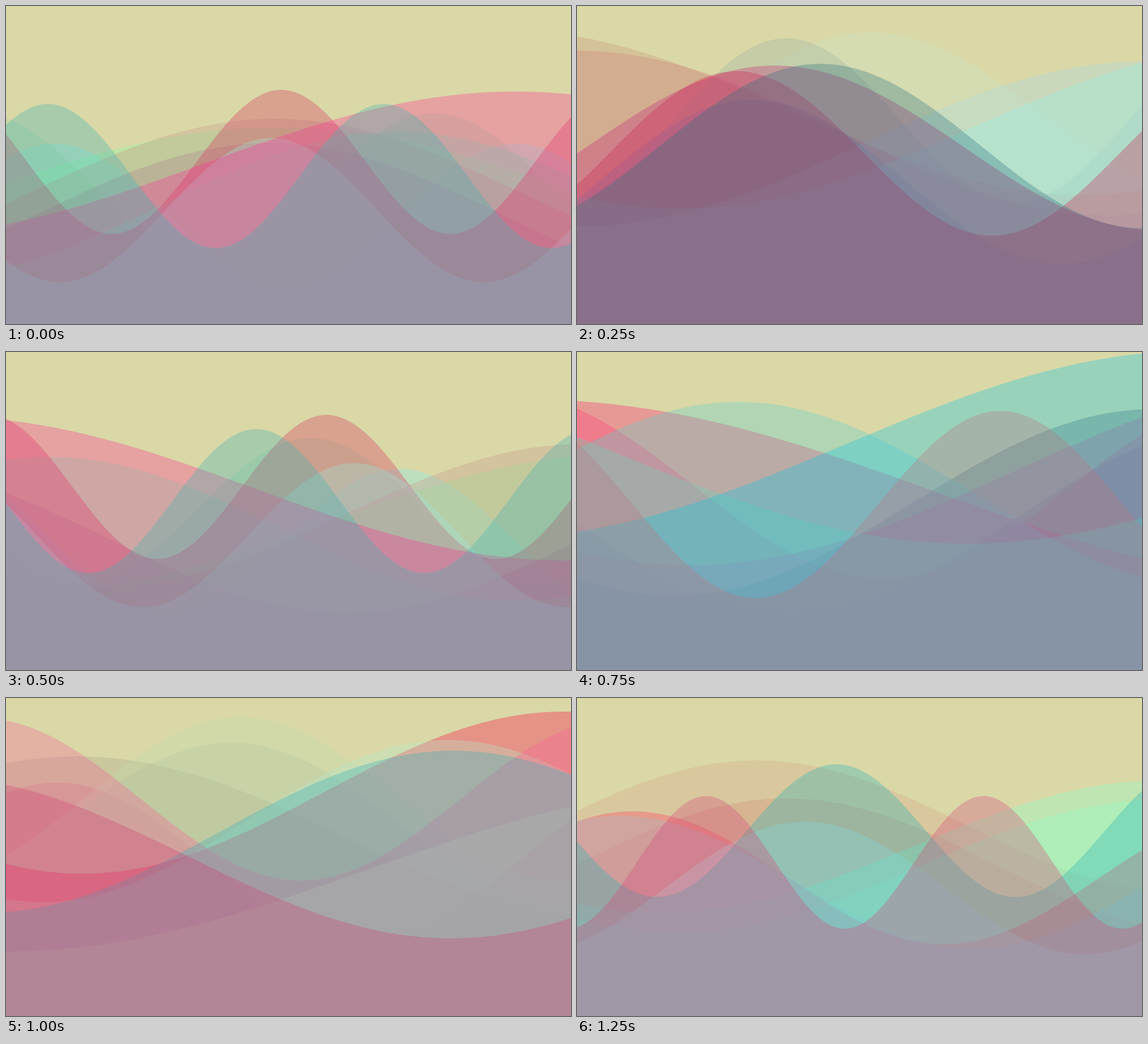
An HTML page with a canvas that plays this animation: 998 by 561 pixels, repeating every 1500 ms.

```html
<!DOCTYPE html>
<html lang="en">
<head>
<meta charset="utf-8">
<title>Layered waves</title>
<style>
  html, body { margin: 0; width: 100%; height: 100%; overflow: hidden; background: #dad8a7; }
  canvas { display: block; width: 100%; height: 100%; }
</style>
</head>
<body>
<canvas id="stage" width="998" height="561"></canvas>
<script>
const W = 998, H = 561, HOLD = 250, ALPHA = 0.32;
const ctx = document.getElementById('stage').getContext('2d');

// A wave is: crest x, crest y, wavelength, colour. Lists run back to front.
const scene = (amp, waves) => ({ amp, waves });

// One family of waves appears twice, slid sideways and lifted.
const family = (lift, crests) => scene(127, [
  [243, 815, '#82ebeb'],
  [189, 805, '#9acf9e'],
  [214, 2244, '#89f79b'],
  [199, 1710, '#c3968c'],
  [242, 1654, '#aa828c'],
  [222, 1645, '#70ebb4'],
  [148, 598, '#d4305a'],
  [233, 748, '#a0e4d8'],
  [151, 2200, '#fc2f92'],
  [173, 593, '#3eb2b0']
].map(([y, len, colour], i) => [crests[i], y - lift, len, colour]));

const purple = scene(145, [
  [520, 47, 1223, '#cde4c3'],
  [0, 79, 1886, '#d77882'],
  [-126, 43, 2033, '#c79378'],
  [370, 57, 806, '#9bb29e'],
  [1228, 67, 2096, '#8cfaeb'],
  [310, 165, 1090, '#6496be'],
  [1000, 98, 1980, '#a5d7e1'],
  [350, 105, 1340, '#c32378'],
  [282, 115, 902, '#cd2855'],
  [430, 102, 1135, '#2d7080']
]);

const slate = scene(165, [
  [-406, 130, 1572, '#967896'],
  [-130, 70, 1340, '#ff507d'],
  [1015, 101, 1690, '#465a64'],
  [-82, 84, 2890, '#ff166c'],
  [285, 88, 1693, '#5dccc9'],
  [-200, 46, 2287, '#c85596'],
  [-577, 8, 2535, '#69d2b9'],
  [1093, -2, 2475, '#12c5e2'],
  [748, 104, 866, '#bb7480']
]);
slate.waves[5][0] = 1343;

const rose = scene(143, [
  [90, 149, 1080, '#d76e82'],
  [398, 79, 1200, '#acbe9e'],
  [125, 103, 1904, '#a8a68a'],
  [415, 34, 1110, '#bedaac'],
  [985, 24, 1700, '#fa0040'],
  [780, 74, 1427, '#b2e8cb'],
  [-42, 36, 1125, '#f66298'],
  [790, 93, 1650, '#33aeba'],
  [1270, 161, 2539, '#acbeb2'],
  [-135, 138, 1841, '#ce4173']
]);

const mist = scene(117, [
  [318, 110, 1503, '#d7a487'],
  [370, 177, 1480, '#d28c78'],
  [1030, 180, 1700, '#92fdc5'],
  [1036, 145, 1772, '#82fdc8'],
  [98, 200, 1100, '#ff3c64'],
  [75, 208, 1250, '#a6baca'],
  [403, 218, 990, '#aaf0ee'],
  [458, 117, 633, '#23b2b7'],
  [228, 173, 490, '#d4487a']
]);

const scenes = [
  family(0, [85, 757, 480, 475, 465, 690, 486, 469, 900, 74]),
  purple,
  family(37, [695, 538, 1116, 1020, -227, 75, 566, 615, -110, 442]),
  slate,
  rose,
  mist
];

function fillWave(amp, [x0, y0, len, colour]) {
  ctx.beginPath();
  ctx.moveTo(0, H);
  for (let x = 0; x <= W; x += 2) {
    ctx.lineTo(x, y0 + amp * (1 - Math.cos((x - x0) / len * 2 * Math.PI)));
  }
  ctx.lineTo(W, H);
  ctx.closePath();
  ctx.fillStyle = colour;
  ctx.fill();
}

function draw({ amp, waves }) {
  ctx.globalAlpha = 1;
  ctx.fillStyle = '#dad8a7';
  ctx.fillRect(0, 0, W, H);
  ctx.globalAlpha = ALPHA;
  waves.forEach(w => fillWave(amp, w));
}

const start = performance.now();
function tick() {
  const step = Math.floor((performance.now() - start) / HOLD);
  draw(scenes[step % scenes.length]);
  requestAnimationFrame(tick);
}
tick();
</script>
</body>
</html>
```
